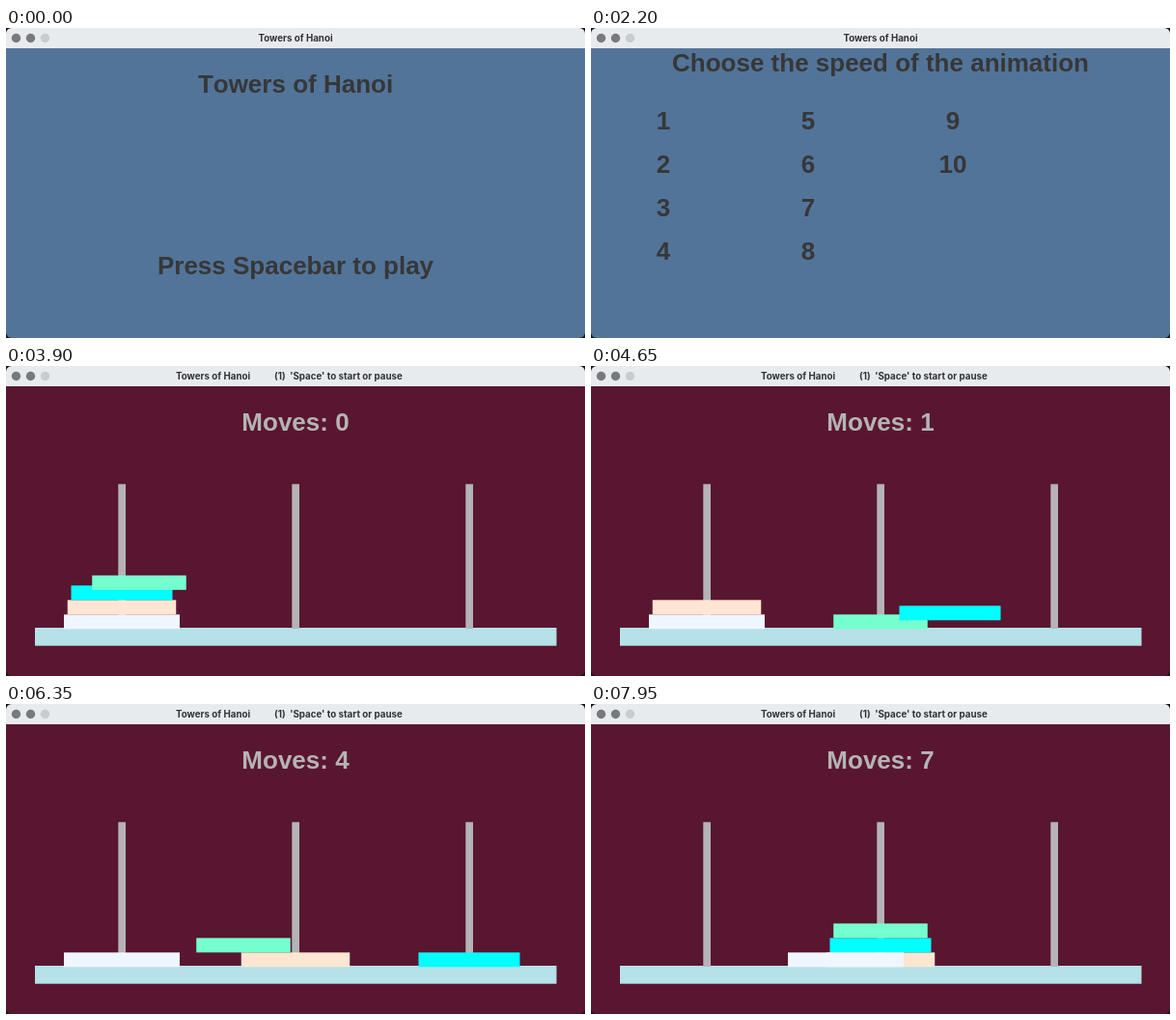
An HTML page with a canvas for the animation above (8 s loop, 600 by 321 pixels).

```html
<!DOCTYPE html>
<html lang="en">
<head>
<meta charset="utf-8">
<title>Towers of Hanoi</title>
<style>
  html, body { margin: 0; width: 100%; height: 100%; overflow: hidden; background: #000; }
  canvas { display: block; }
</style>
</head>
<body>
<canvas id="stage" width="600" height="321"></canvas>
<script>
const ctx = document.getElementById('stage').getContext('2d');
const LOOP = 8000, TICK = 50;
const BLUE = '#527499', WINE = '#591630', INK = '#373737', GREY = '#b5b3b5';
const PEGS = [120, 300, 480];
const DISK_H = 15, FLOOR = 272.3;

// Largest disk first
const DISKS = [
  { w: 120, color: '#f0f6ff' },
  { w: 112.5, color: '#ffe6d2' },
  { w: 105, color: '#00ffff' },
  { w: 97.5, color: '#76ffce' }
];

// start and dur in ms; a move with "land" stalls just short until that time
const MOVES = [
  { from: 0, to: 1, start: 3860, dur: 400 },
  { from: 0, to: 2, start: 4370, dur: 400 },
  { from: 1, to: 2, start: 4950, dur: 400 },
  { from: 0, to: 1, start: 5620, dur: 280 },
  { from: 2, to: 0, start: 6090, dur: 400, land: 6750 },
  { from: 2, to: 1, start: 6700, dur: 400 },
  { from: 0, to: 1, start: 7200, dur: 400 },
  { from: 0, to: 2, start: 7850, dur: 250 }
];

function rect(x, y, w, h, color) {
  ctx.fillStyle = color;
  ctx.fillRect(x, y, w, h);
}

function heading(str, y, color = INK) {
  ctx.font = 'bold 26px "Liberation Sans", Arial, sans-serif';
  ctx.fontKerning = 'none';
  ctx.textAlign = 'center';
  ctx.fillStyle = color;
  ctx.fillText(str, 300, y);
}

function barText(str, x, align) {
  ctx.font = '700 9.75px Inter, sans-serif';
  ctx.fontKerning = 'auto';
  ctx.textAlign = align;
  ctx.fillStyle = '#303133';
  ctx.fillText(str, x, 13.6);
}

function titleBar(playing) {
  rect(0, 0, 600, 21, '#e8ebee');
  ['#77797b', '#77797b', '#c9cbcd'].forEach((color, i) => {
    ctx.fillStyle = color;
    ctx.beginPath();
    ctx.arc(10.5 + 15 * i, 10.5, 4.7, 0, Math.PI * 2);
    ctx.fill();
  });
  if (playing) {
    barText('Towers of Hanoi', 176, 'left');
    barText("(1)  'Space' to start or pause", 278, 'left');
  } else {
    barText('Towers of Hanoi', 300, 'center');
  }
}

function intro() {
  heading('Towers of Hanoi', 67);
  heading('Press Spacebar to play', 254.5);
}

function menu(title, count) {
  heading(title, 44.5);
  for (let i = 0; i < count; i++) {
    ctx.fillText(i + 1, 75 + 150 * Math.floor(i / 4), 104.5 + 45 * (i % 4));
  }
}

function progress(move, t) {
  const p = Math.round((t - move.start) / move.dur * 20 + 1e-6) / 20;
  const max = move.land && t < move.land ? 0.95 : 1;
  return Math.max(0, Math.min(max, p));
}

const slotY = level => FLOOR - DISK_H * (level + 1);

function drawDisk(id, cx, y) {
  const { w, color } = DISKS[id];
  rect(cx - w / 2, y, w, DISK_H, color);
}

function game(t) {
  const stacks = [[0, 1, 2, 3], [], []];
  let done = 0, flying = null;
  for (const move of MOVES) {
    const p = progress(move, t);
    if (p === 0) break;
    const id = stacks[move.from].pop();
    if (p < 1) {
      const x0 = PEGS[move.from], x1 = PEGS[move.to];
      const y0 = slotY(stacks[move.from].length), y1 = slotY(stacks[move.to].length);
      flying = [id, x0 + (x1 - x0) * p, y0 + (y1 - y0) * p];
      break;
    }
    stacks[move.to].push(id);
    done++;
  }

  heading('Moves: ' + done, 67, GREY);
  rect(30, 271, 540.5, 18.7, '#b5e1e8');
  PEGS.forEach(x => rect(x - 3.7, 122.3, 7.7, 149.7, GREY));
  stacks.forEach((stack, peg) =>
    stack.forEach((id, level) => drawDisk(id, PEGS[peg], slotY(level))));
  if (flying) drawDisk(...flying);
}

function draw(t) {
  const playing = t >= 2950;
  rect(0, 0, 600, 321, '#10141a');
  ctx.save();
  ctx.beginPath();
  ctx.roundRect(0, 0, 600, 321, 6);
  ctx.clip();
  rect(0, 0, 600, 321, playing ? WINE : BLUE);
  titleBar(playing);
  if (playing) game(t);
  else if (t >= 1600) menu('Choose the speed of the animation', 10);
  else if (t >= 400) menu('Choose the number of disks', 16);
  else intro();
  ctx.restore();
}

const origin = performance.now();
function frame() {
  const t = (performance.now() - origin) % LOOP;
  draw(Math.floor(t / TICK) * TICK);
  requestAnimationFrame(frame);
}
frame();
</script>
</body>
</html>
```
